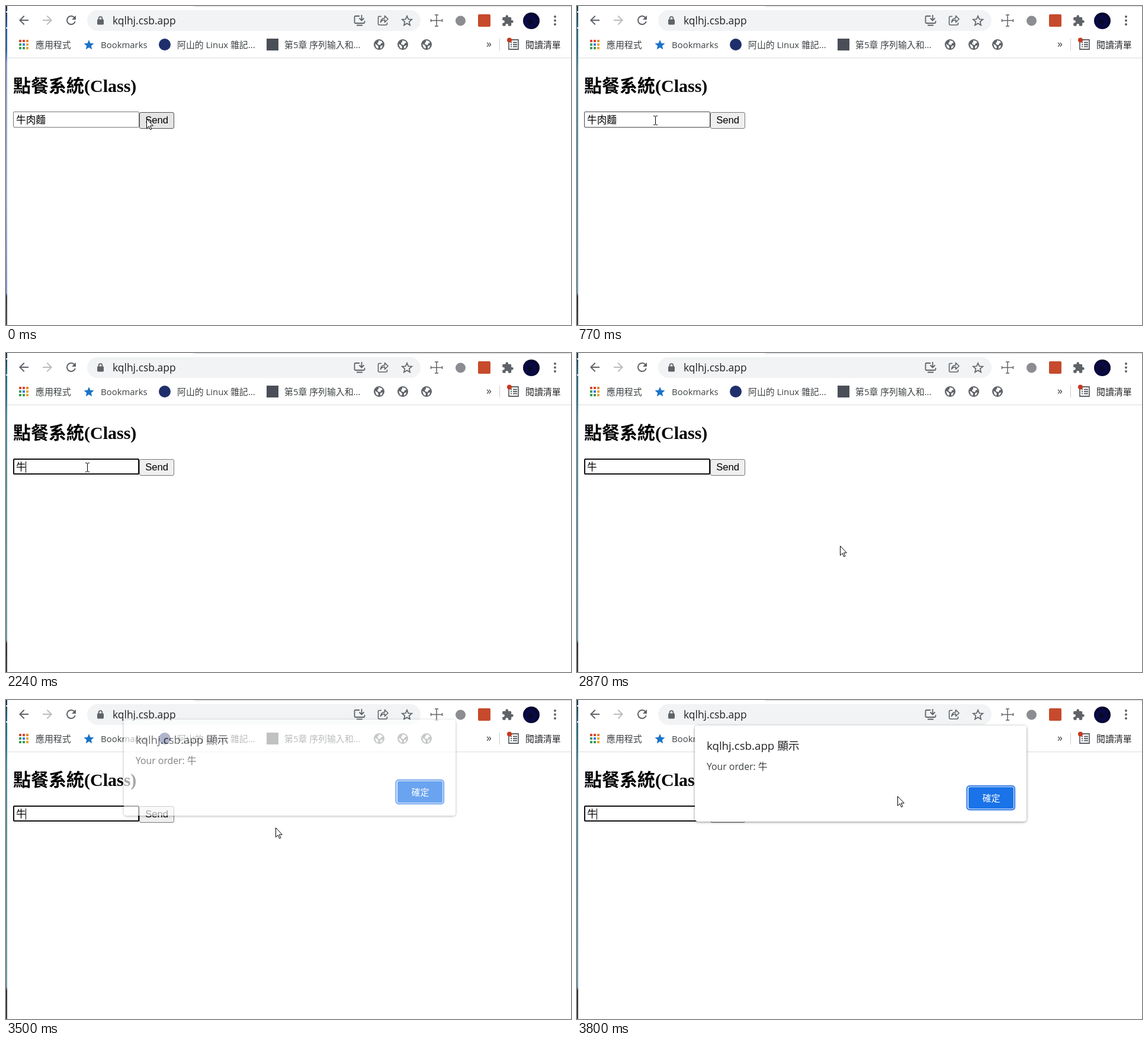
An HTML page that plays this animation: 954 px wide and 538 px high, repeating every 3880 ms.

```html
<!DOCTYPE html>
<html lang="zh-Hant">
<head>
<meta charset="utf-8">
<title>點餐系統</title>
<style>
html, body { margin: 0; width: 100%; height: 100%; overflow: hidden; background: #fff; }
svg { display: block; width: 954px; height: 538px; }
text { white-space: pre; }
.ui { font-family: "Open Sans", "Noto Sans CJK TC", sans-serif; fill: #3c4043; }
.mark { font-size: 14.9px; }
.form { font: 16.67px "Liberation Sans", "Noto Sans CJK TC", sans-serif; fill: #000; }
.h2 { font: bold 30px "Liberation Serif", "Noto Sans CJK TC", serif; }
.line { fill: none; stroke: #5f6368; stroke-width: 1.8; }
.solid { fill: #5f6368; }

.anim { animation: 3880ms step-end infinite; }
#cool { opacity: 0; animation-name: cool; }
#button { fill: #e5e5e5; stroke: #4f4f4f; animation-name: button; }
#input { stroke: #767676; animation-name: input; }
#focus { opacity: 0; animation-name: focus; }
#second { animation-name: second; }
#third { animation-name: third; }
#caret { opacity: 0; animation-name: caret; }
#dialog { opacity: 0; animation-name: dialog; }
#mouse { transform: translate(237px, 190px); animation-name: mouse; }
#arrow { animation-name: arrow; }
#beam { opacity: 0; animation-name: beam; }

@keyframes cool { 7.73%, 100% { opacity: 1; } }
@keyframes button { 15.72%, 100% { fill: #efefef; stroke: #767676; } }
@keyframes input { 15.72%, 100% { stroke: #444; } }
@keyframes focus { 23.71%, 100% { opacity: 1; } }
@keyframes third { 41.75%, 100% { opacity: 0; } }
@keyframes second { 45.61%, 100% { opacity: 0; } }
@keyframes caret {
  23.71% { opacity: 1; transform: translateX(33px); }
  35.82% { opacity: 0; transform: none; }
  50% { opacity: 1; }
  63.91% { opacity: 0; }
  76.03%, 100% { opacity: 1; }
}
@keyframes dialog {
  87.88% { opacity: .02; transform: translateY(-23px); }
  90.2% { opacity: .65; transform: translateY(-10px); }
  92.01% { opacity: 1; transform: translateY(-3px); }
  94.07%, 100% { opacity: 1; transform: none; }
}
@keyframes arrow { 15.72% { opacity: 0; } 61.85% { opacity: 1; } }
@keyframes beam { 15.72% { opacity: 1; } 61.85% { opacity: 0; } }
@keyframes mouse {
  1.8% { transform: translate(243px, 191px); }
  3.86% { transform: translate(249px, 191px); }
  7.73% { transform: translate(248px, 191px); }
  9.53% { transform: translate(243px, 191px); }
  11.59% { transform: translate(235px, 191px); }
  15.72% { transform: translate(205px, 193px); }
  17.78% { transform: translate(160px, 193px); }
  19.84% { transform: translate(132px, 193px); }
  25.51% { transform: translate(130px, 193px); }
  29.89% { transform: translate(128px, 193px); }
  57.73% { transform: translate(137px, 193px); }
  59.79% { transform: translate(150px, 196px); }
  61.85% { transform: translate(184px, 230px); }
  63.91% { transform: translate(240px, 285px); }
  65.97% { transform: translate(308px, 340px); }
  68.04% { transform: translate(368px, 371px); }
  70.1% { transform: translate(392px, 379px); }
  72.16% { transform: translate(420px, 362px); }
  73.96% { transform: translate(444px, 325px); }
  76.03% { transform: translate(456px, 280px); }
  77.83% { transform: translate(458px, 250px); }
  81.95% { transform: translate(458px, 245px); }
  83.76% { transform: translate(458px, 238px); }
  85.82% { transform: translate(457px, 231px); }
  87.88% { transform: translate(456px, 225px); }
  90.2% { transform: translate(455px, 215px); }
  92.01% { transform: translate(454px, 208px); }
  96.13% { transform: translate(498px, 188px); }
  97.93%, 100% { transform: translate(541px, 162px); }
}
</style>
</head>
<body>
<svg viewBox="0 0 954 538">
  <defs>
    <linearGradient id="blue" x2="0" y2="1">
      <stop offset="0" stop-color="#16233f"/>
      <stop offset=".06" stop-color="#1d55a0"/>
      <stop offset=".14" stop-color="#1f66b8"/>
      <stop offset=".18" stop-color="#8ea0c8"/>
      <stop offset=".6" stop-color="#a3b0d2"/>
      <stop offset=".9" stop-color="#7d92c4"/>
      <stop offset=".91" stop-color="#3a3a40"/>
      <stop offset="1" stop-color="#4a4a4e"/>
    </linearGradient>
    <linearGradient id="teal" x2="0" y2="1">
      <stop offset="0" stop-color="#12323f"/>
      <stop offset=".06" stop-color="#17677f"/>
      <stop offset=".14" stop-color="#1b7890"/>
      <stop offset=".2" stop-color="#4f8a9c"/>
      <stop offset=".9" stop-color="#6f9cab"/>
      <stop offset=".91" stop-color="#2c2c30"/>
      <stop offset="1" stop-color="#3c3c40"/>
    </linearGradient>
    <radialGradient id="photo" cx=".45" cy=".55">
      <stop offset="0" stop-color="#07071c"/>
      <stop offset=".55" stop-color="#0a0a4a"/>
      <stop offset="1" stop-color="#06062c"/>
    </radialGradient>
    <filter id="shadow" x="-5%" y="-10%" width="110%" height="125%">
      <feDropShadow dx="0" dy="1" stdDeviation="2" flood-opacity=".45"/>
    </filter>
    <path id="star" d="M12 17.27 18.18 21l-1.64-7.03L22 9.24l-7.19-.61L12 2 9.19 8.63 2 9.24l5.46 4.73L5.82 21z"/>
    <path id="back" d="M20 11H7.83l5.59-5.59L12 4l-8 8 8 8 1.41-1.41L7.83 13H20z"/>
    <g id="globe">
      <circle r="9" class="solid"/>
      <path fill="#fff" d="M-1-7 4-6 6-3 3-2 2 1-2 0-3-3-1-4zM-7-1-3 1-1 4-2 7-5 5zM2 3 6 1 5 5 2 7z"/>
    </g>
  </defs>

  <rect width="954" height="538" fill="#fff"/>
  <rect width="2" height="538" fill="url(#blue)"/>
  <rect id="cool" class="anim" width="2" height="538" fill="url(#teal)"/>
  <path fill="#fff" d="M0 9h2v2H0zM0 36h2v2H0z"/>

  <!-- toolbar -->
  <path fill="#dee1e6" d="M316 0h638v1.6H322q-4 0-6-1.6z"/>
  <rect x="2" y="87" width="952" height="1" fill="#dadce0"/>
  <rect x="137" y="7" width="563" height="35" rx="17.5" fill="#f1f3f4"/>
  <use href="#back" class="solid" x="18" y="12"/>
  <use href="#back" fill="#babcbe" transform="translate(82 12) scale(-1 1)"/>
  <path class="solid" transform="translate(98 12)" d="M17.65 6.35A7.96 7.96 0 0 0 12 4a8 8 0 1 0 7.73 10h-2.08A6 6 0 1 1 12 6c1.66 0 3.14.69 4.22 1.78L13 11h7V4z"/>
  <rect class="solid" x="154" y="22.5" width="11" height="9" rx="1.4"/>
  <path class="line" d="M156.6 23v-2a2.9 2.9 0 0 1 5.8 0v2"/>
  <text class="ui" x="180" y="31" font-size="17.45" style="fill:#202124">kqlhj.csb.app</text>
  <path class="line" d="M597 17h-7q-1.5 0-1.5 1.5v9q0 1.5 1.5 1.5h14q1.500 0 1.500-1.500v-2.500M592 32.500h10M600.500 15v9M596.500 20.500l4 4 4-4"/>
  <path class="line" stroke-linejoin="round" d="M634 17.500h-3.500q-2 0-2 2v10.500q0 2 2 2h11q2 0 2-2v-2M632.500 27.500c.5-5 3.500-7 7-7v-4l5.500 5.500-5.500 5.500v-4c-3.500 0-5.500 1-7 4z" style="stroke-width:1.6"/>
  <use href="#star" class="line" transform="translate(667.2 15.200) scale(.82)" style="stroke-width:2.100"/>
  <path class="line" style="stroke-width:1.500" d="M727 15v19M717.500 24.500h19M724 15h6M724 34h6M717.500 22v5M736.500 22v5"/>
  <circle cx="767.500" cy="25" r="8.500" fill="#8b8d90"/>
  <rect x="797" y="14" width="21" height="21" rx="2" fill="#c74a2c"/>
  <path class="solid" transform="translate(836.500 14.400) scale(.88)" d="M20.500 11H19V7c0-1.100-.9-2-2-2h-4V3.500a2.500 2.500 0 0 0-5 0V5H4c-1.100 0-2 .9-2 2v3.800h1.500a2.700 2.700 0 0 1 0 5.400H2V20c0 1.100.9 2 2 2h3.800v-1.500a2.700 2.700 0 0 1 5.400 0V22H17c1.100 0 2-.9 2-2v-4h1.500a2.500 2.500 0 0 0 0-5z"/>
  <circle cx="887" cy="25" r="14" fill="url(#photo)"/>
  <g class="solid">
    <circle cx="927" cy="18" r="2"/><circle cx="927" cy="24.500" r="2"/><circle cx="927" cy="31" r="2"/>
  </g>

  <!-- bookmarks -->
  <g id="apps"></g>
  <use href="#star" fill="#1a73c8" transform="translate(129.800 55.300) scale(.85)"/>
  <circle cx="268" cy="65" r="10" fill="#1f2f6b"/>
  <rect x="440" y="55" width="20" height="20" fill="#4a4f57"/>
  <use href="#globe" x="630" y="65"/>
  <use href="#globe" x="670" y="65"/>
  <use href="#globe" x="710" y="65"/>
  <g class="ui mark">
    <text x="50" y="71">應用程式</text>
    <text x="160" y="71">Bookmarks</text>
    <text x="289" y="71">阿山的 Linux 雜記...</text>
    <text x="470" y="71">第5章 序列输入和...</text>
    <text x="877" y="71" style="fill:#202124">閱讀清單</text>
    <text x="811" y="70" font-size="18">»</text>
  </g>
  <rect x="833" y="55" width="1" height="20" fill="#c8cacd"/>
  <path class="line" d="M849 57h16v16h-16zM852 61.500h2M852 65h2M852 68.500h2M856 61.500h7M856 65h7M856 68.500h7"/>
  <circle cx="850" cy="57.500" r="4" fill="#c5391f"/>

  <!-- page -->
  <text class="h2" x="12" y="145">點餐系統(Class)</text>
  <rect id="input" class="anim" x="12.500" y="178.500" width="212" height="26" rx="1.500" fill="#fff"/>
  <rect id="focus" class="anim" x="13" y="179" width="211" height="25" rx="1.500" fill="#fff" stroke="#101010" stroke-width="2"/>
  <g class="form">
    <text x="17" y="198">牛</text>
    <text id="second" class="anim" x="33.670" y="198">肉</text>
    <text id="third" class="anim" x="50.330" y="198">麵</text>
  </g>
  <rect id="caret" class="anim" x="33" y="183" width="1" height="19"/>
  <rect id="button" class="anim" x="225.500" y="179.500" width="58" height="27" rx="2.500"/>
  <text class="form" x="254.700" y="198" text-anchor="middle">Send</text>

  <g id="dialog" class="anim">
    <rect x="199" y="43" width="560" height="162" rx="5" fill="#fff" filter="url(#shadow)"/>
    <g class="ui">
      <text x="219" y="84" font-size="18.700" style="fill:#202124">kqlhj.csb.app 顯示</text>
      <text x="219" y="118" font-size="15.800">Your order: 牛</text>
      <rect x="658.500" y="145" width="80.500" height="40" rx="4.500" fill="#fff" stroke="#4285e8" stroke-width="2.400"/>
      <rect x="661" y="147" width="76" height="36" rx="2.500" fill="#1a73e8"/>
      <text x="699.500" y="171" font-size="15" text-anchor="middle" style="fill:#fff">確定</text>
    </g>
  </g>

  <g id="mouse" class="anim">
    <path id="arrow" class="anim" fill="#fff" stroke="#000" d="M.5.500v15.800l3.600-3.500 2.500 5.800 2.300-1-2.500-5.600h5z"/>
    <path id="beam" class="anim" fill="none" stroke="#000" d="M-3-7.500H0M1-7.500h3M.5-7v14M-3 7.500H0M1 7.500h3"/>
  </g>
</svg>
<script>
const colors = ["#d9492f", "#d9492f", "#e8842c", "#3a9d58", "#3b7de0", "#e8a52c", "#3a9d58", "#3a9d58", "#e8a52c"];
document.getElementById("apps").innerHTML = colors.map((c, i) =>
  `<rect x="${22 + i % 3 * 6}" y="${57 + Math.floor(i / 3) * 6}" width="4" height="4" fill="${c}"/>`).join("");
</script>
</body>
</html>
```
